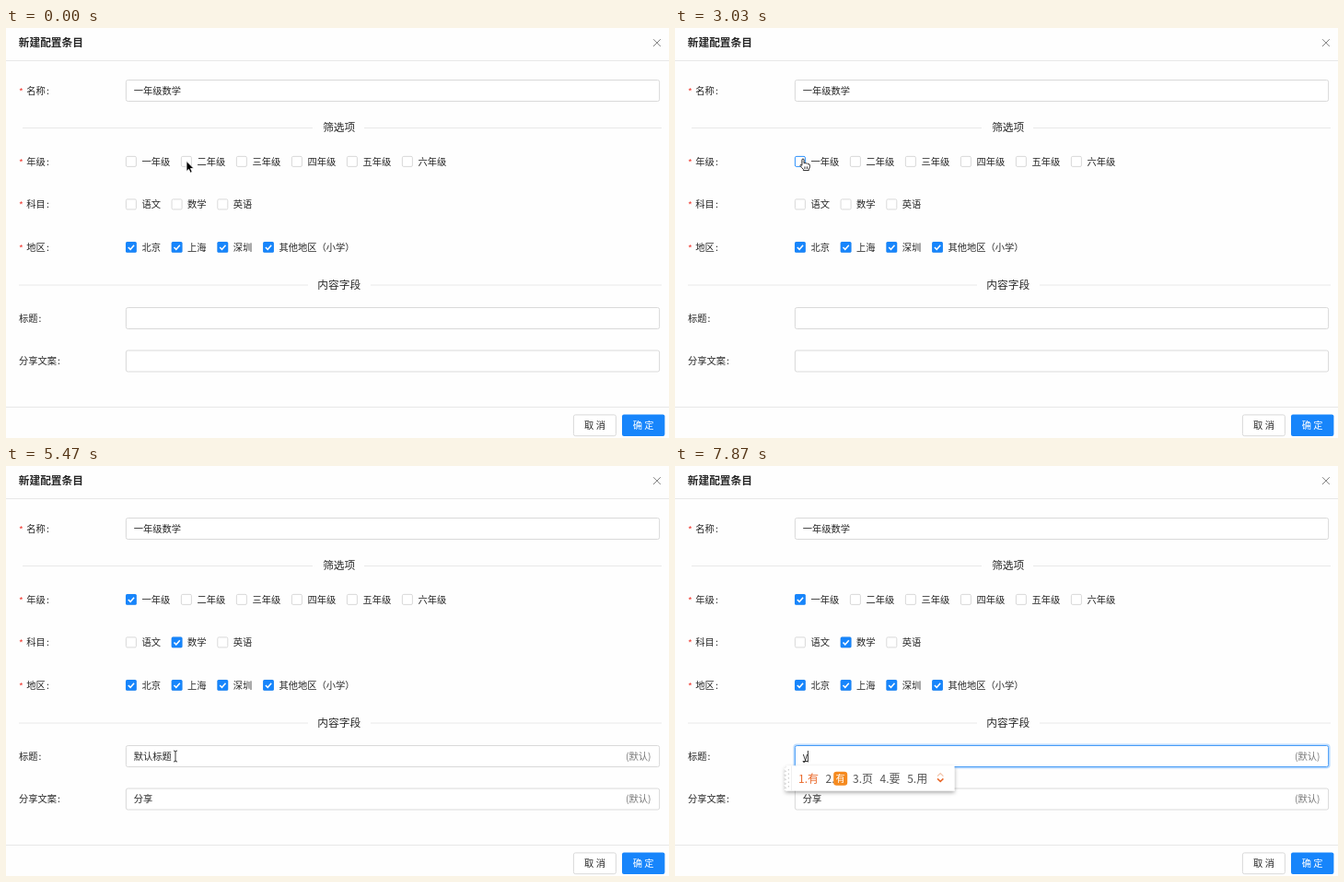
Recreate the animation shown at these times as an HTML page. Size 720 px wide and 445 px high, loop 8000 ms.

```html
<!DOCTYPE html>
<html lang="zh-CN">
<head>
<meta charset="utf-8">
<title>新建配置条目</title>
<style>
  html, body { margin: 0; width: 100%; height: 100%; overflow: hidden; background: #fefefe; }
  svg { display: block; width: 100%; height: 100%; cursor: default; }
  text { font: 10.25px "Noto Sans CJK SC", "Noto Sans CJK JP", "Noto Sans CJK", sans-serif; fill: #262626; white-space: pre; }
  text.head { font-size: 11.7px; font-weight: 500; }
  text.title { font-size: 11.7px; font-weight: 700; }
  text.ime { font-size: 12px; fill: #555; }
</style>
</head>
<body>
<svg id="stage" viewBox="0 0 720 445">
  <defs>
    <clipPath id="selClip"><rect id="selArea" y="307" height="16"/></clipPath>
    <filter id="shade" x="-10%" y="-30%" width="120%" height="180%">
      <feDropShadow dx="0" dy="2" stdDeviation="2.2" flood-color="#000" flood-opacity=".35"/>
    </filter>
  </defs>
</svg>
<script>
const LOOP = 8000, BLUE = '#1785fb', GREY = '#d5d5d5';
const CHECK_GRADE = 3270, CHECK_SUBJECT = 4270, FOCUS = 5500, TYPE = 7680;
const stage = document.getElementById('stage');

function add(tag, attrs, parent = stage, content) {
  const el = document.createElementNS('http://www.w3.org/2000/svg', tag);
  set(el, attrs);
  if (content !== undefined) el.textContent = content;
  parent.appendChild(el);
  return el;
}
function set(el, attrs) {
  for (const k in attrs) el.setAttribute(k, attrs[k]);
}
function show(el, on) { el.style.display = on ? '' : 'none'; }

// Text is centred vertically on y.
function label(x, y, str, attrs = {}, parent = stage, size = 10.25) {
  return add('text', { x, y: y + size * 0.37, ...attrs }, parent, str);
}
function line(x1, x2, y, color = '#e6e6e6') {
  add('path', { d: `M${x1} ${y}H${x2}`, stroke: color, 'stroke-width': 0.9 });
}
function box(x, y, w, h, attrs, parent = stage) {
  return add('rect', { x, y, width: w, height: h, rx: 2, ...attrs }, parent);
}
function field(y) {
  return box(130.4, y - 11.5, 579.2, 23, { fill: '#fff', stroke: GREY, 'stroke-width': 0.9 });
}
function rowName(y, str, required) {
  const x = required ? 22.2 : 13.9;
  if (required) label(14, y + 1, '*', { style: 'fill:#f0443c' });
  label(x, y, str);
  label(x + str.length * 10.25 + 1.2, y, ':');
}
function checkbox(x, y, str) {
  const rim = box(x + 0.4, y - 5.6, 11, 11, { fill: '#fff', stroke: GREY, 'stroke-width': 0.9, rx: 1.4 });
  const mark = add('g', {});
  box(x, y - 6, 11.8, 11.8, { fill: BLUE, rx: 1.5 }, mark);
  add('path', { d: `M${x + 2.8} ${y - 0.1}l2.3 2.4 4-4.6`, fill: 'none', stroke: '#fff', 'stroke-width': 1.5 }, mark);
  label(x + 17.4, y, str);
  return { rim, mark };
}
function group(y, names, step) {
  return names.map((n, i) => checkbox(130 + i * step, y, n));
}
function section(y, str, x1, left, right) {
  line(x1, left, y + 0.5);
  line(right, 712, y + 0.5);
  label(361.7, y, str, { class: 'head', 'text-anchor': 'middle' }, stage, 11.7);
}

// Form
label(13.8, 16, '新建配置条目', { class: 'title' }, stage, 11.7);
add('path', { d: 'M703 12.2l7.8 7.8m0-7.8l-7.8 7.8', stroke: '#808080', 'stroke-width': 1 });
line(0, 720, 35.5);
rowName(68, '名称', true);
field(68);
label(138.7, 68, '一年级数学');
section(108, '筛选项', 18, 333, 389);
rowName(145, '年级', true);
const grades = group(145, [...'一二三四五六'].map(c => c + '年级'), 60);
rowName(191.5, '科目', true);
const subjects = group(191.5, ['语文', '数学', '英语'], 49.7);
rowName(238, '地区', true);
const regions = group(238, ['北京', '上海', '深圳', '其他地区（小学）'], 49.7);
section(278.5, '内容字段', 14, 328, 396);
rowName(315, '标题');
const glow = box(129.2, 302.4, 581.6, 25.2, { fill: 'none', stroke: BLUE, 'stroke-width': 1.6, rx: 3 });
const titleField = field(315);
rowName(361.5, '分享文案');
field(361.5);
line(0, 720, 411.5);
box(616.4, 419.9, 46, 22.8, { fill: '#fff', stroke: GREY, 'stroke-width': 0.9 });
box(669, 419.5, 46.4, 23.6, { fill: BLUE });
label(639.5, 431.5, '取 消', { 'text-anchor': 'middle' });
label(692.2, 431.5, '确 定', { 'text-anchor': 'middle', style: 'fill:#fff' });

// Values filled in after the subject is chosen
const filled = add('g', {});
for (const y of [315, 361.5]) label(673, y, '(默认)', { style: 'fill:#777' }, filled);
label(138.7, 361.5, '分享', {}, filled);
const heading = label(138.7, 315, '默认标题');
const picked = add('g', { 'clip-path': 'url(#selClip)' });
box(138.7, 307, 41.3, 16, { fill: BLUE, rx: 0 }, picked);
label(138.7, 315, '默认标题', { style: 'fill:#fff' }, picked);
const selArea = document.getElementById('selArea');

// Typed letter and candidate window
const typing = add('g', {});
label(138.8, 315, 'y', {}, typing);
add('path', { d: 'M138.7 320.5H144M144.4 309V321.5', stroke: '#222', 'stroke-width': 0.9 }, typing);
let edge = 'M303.5 325.3V352.5H121';
for (let y = 352.5; y > 326; y -= 4.5) edge += `L118.5 ${y - 1.2}L121.5 ${y - 3}`;
add('path', { d: edge + 'L121 325.3Z', fill: '#fff', filter: 'url(#shade)' }, typing);
add('path', { d: 'M123.3 329V350', stroke: '#c4c4c4', 'stroke-width': 1, 'stroke-dasharray': '1.5 3' }, typing);
add('path', { d: 'M126.5 325.5V352.3', stroke: '#ececec', 'stroke-width': 0.8 }, typing);
['有', '', '页', '要', '用'].forEach((c, i) => {
  const style = i ? '' : 'fill:#ea6b2d';
  label(134 + i * 29.6 - (i > 1 ? 0.2 : 0), 339.5, `${i + 1}.${c}`, { class: 'ime', style }, typing, 12);
});
box(172.2, 331.8, 15, 15, { fill: '#f58a1f', rx: 3.2 }, typing);
label(179.7, 339.3, '有', { 'text-anchor': 'middle', style: 'fill:#fff' }, typing);
add('path', { d: 'M285 336.6l3.2-3 3.2 3', fill: 'none', stroke: '#f2c3a8', 'stroke-width': 1.2 }, typing);
add('path', { d: 'M285 339.4l3.2 3 3.2-3', fill: 'none', stroke: '#ea6b2d', 'stroke-width': 1.5 }, typing);

// Pointers, each with its hot spot at 0,0
const pointers = {
  arrow: add('path', { d: 'M0 0V11L2.5 8.8 4.2 12.7 6.2 11.8 4.5 8H8Z', fill: '#000', stroke: '#fff', 'stroke-width': 0.8 }),
  hand: add('path', {
    d: 'M-1.1 1.2Q-1 0 0 0T1.1 1.2V4.8Q2.4 3.9 3.2 5Q4.5 4.2 5.2 5.6Q7.4 5.2 7.4 7.2V8.6Q7.2 10 6.3 11.2V12.6H.4V11.4Q-1.6 9.6 -3 7.4Q-3.2 5.6 -1.1 7.2ZM2 8.4V11M4.4 8.4V11',
    fill: '#fff', stroke: '#111', 'stroke-width': 0.9, 'stroke-linejoin': 'round'
  }),
  beam: add('path', { d: 'M-2-6Q0-6 0-4.5Q0-6 2-6M0-4.5V4.5M-2 6Q0 6 0 4.5Q0 6 2 6', fill: 'none', stroke: '#222', 'stroke-width': 0.9 })
};

// Pointer path: time, x, y
const path = [
  [0, 196, 144.5], [480, 190.5, 152], [2450, 190.5, 152], [2900, 139, 142], [3480, 139, 142],
  [3870, 199.5, 199], [4080, 192, 193], [4600, 192, 193], [4970, 210.5, 290.5],
  [5300, 184, 315], [5520, 184, 315], [5920, 113.5, 315]
];
function shapeAt(t) {
  if (t < 60) return 'arrow';
  if (t < 3600) return 'hand';
  if (t < 3900) return 'arrow';
  if (t < 4680) return 'hand';
  if (t < 5060) return 'arrow';
  return t < 5820 ? 'beam' : 'arrow';
}
const clamp = v => Math.max(0, Math.min(1, v));
const ease = v => v * v * (3 - 2 * v);
function posAt(t) {
  const i = path.findIndex(p => p[0] > t);
  if (i < 0) return path[path.length - 1].slice(1);
  const [t0, x0, y0] = path[i - 1], [t1, x1, y1] = path[i];
  const k = ease((t - t0) / (t1 - t0));
  return [x0 + (x1 - x0) * k, y0 + (y1 - y0) * k];
}
function mix(k) {
  const part = (a, b) => Math.round(a + (b - a) * k);
  return `rgb(${part(213, 23)},${part(213, 133)},${part(213, 251)})`;
}
// Fades in at a and out at b.
const fade = (t, a, b) => clamp((t - a) / 250) * (1 - clamp((t - b) / 250));

function hover(item, t, a, b) { item.rim.setAttribute('stroke', mix(fade(t, a, b))); }
function checked(item, k) { item.mark.setAttribute('opacity', k); }

for (const item of [...grades, ...subjects]) checked(item, 0);

function draw(t) {
  hover(grades[1], t, 40, 2560);
  hover(grades[0], t, 2650, 3560);
  hover(subjects[1], t, 3770, 4650);
  checked(grades[0], clamp((t - CHECK_GRADE) / 150));
  checked(subjects[1], clamp((t - CHECK_SUBJECT) / 150));

  show(filled, t >= CHECK_SUBJECT + 60);
  show(heading, t >= CHECK_SUBJECT + 60 && t < TYPE);
  const focus = clamp((t - FOCUS) / 250);
  titleField.setAttribute('stroke', mix(focus * 0.85));
  glow.setAttribute('opacity', focus * 0.28);

  const [x, y] = posAt(t);
  const left = Math.max(138.7, Math.min(180, x));
  set(selArea, { x: left, width: 180 - left });
  show(picked, t >= FOCUS && t < TYPE);
  show(typing, t >= TYPE);

  const shape = shapeAt(t);
  for (const name in pointers) {
    show(pointers[name], name === shape && t < TYPE);
    pointers[name].setAttribute('transform', `translate(${x} ${y})`);
  }
}

const start = performance.now();
function tick() {
  draw((performance.now() - start) % LOOP);
  requestAnimationFrame(tick);
}
tick();
</script>
</body>
</html>
```
